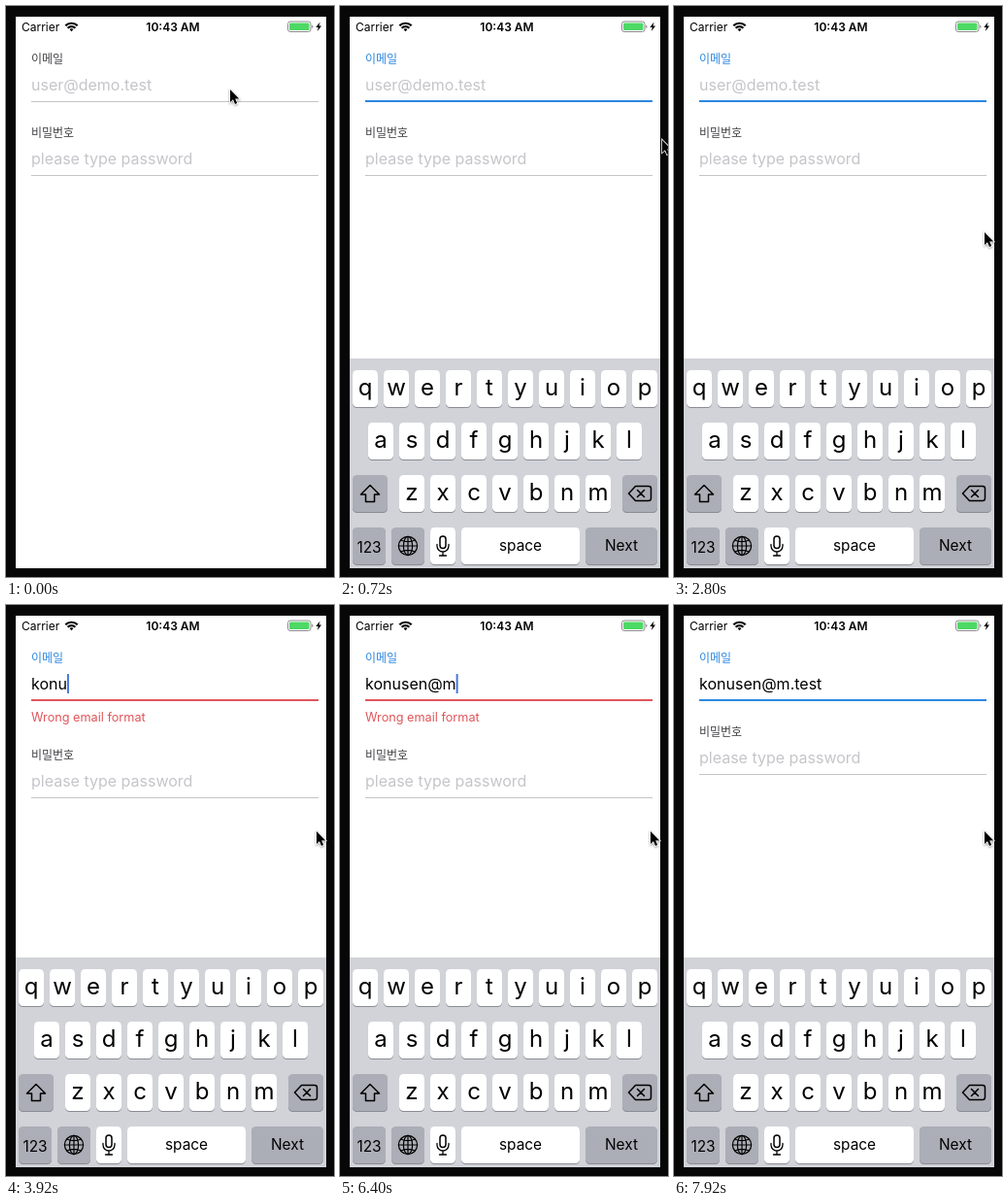
Write an HTML page that moves like this. It is 338x588 px and loops after 8000 ms.

```html
<!DOCTYPE html>
<html lang="ko">
<head>
<meta charset="utf-8">
<style>
  html, body { margin: 0; width: 100%; height: 100%; overflow: hidden; background: #070707; }
  svg { display: block; width: 338px; height: 588px; font-family: Inter, "Open Sans", sans-serif; }
  .label { font: 500 12px "Noto Sans CJK KR", "Noto Sans CJK", sans-serif; fill: #424246; }
  .input { font-size: 16px; }
  .hint { fill: #c5c5ca; }
  .key { font-size: 24px; text-anchor: middle; }
  .word { font-size: 15.4px; text-anchor: middle; }
  .icon { fill: none; stroke: #000; stroke-width: 1.5; stroke-linejoin: round; stroke-linecap: round; }
  #cursor { filter: drop-shadow(0 1px 1px #0006); }
</style>
</head>
<body>
<svg viewBox="0 0 338 588">
  <clipPath id="screen"><path d="M10 11H330V579H10z"/></clipPath>
  <g clip-path="url(#screen)">
    <path d="M10 11H330V579H10z" fill="#fff"/>

    <text x="16" y="25.5" font-size="12">Carrier</text>
    <text x="172" y="25.5" font-size="12" font-weight="600" text-anchor="middle">10:43 AM</text>
    <g fill="none" stroke="#000" stroke-width="2.2">
      <path d="M61.3 20.3a8.8 8.8 0 0 1 12.4 0M63.6 22.8a5.5 5.5 0 0 1 7.8 0"/>
      <path d="M67.5 26.2l-2-2.1a2.9 2.9 0 0 1 4 0z" fill="#000" stroke="none"/>
    </g>
    <rect x="290.5" y="16" width="23.5" height="10.5" rx="2.5" fill="#fff" stroke="#8c8c8c"/>
    <rect x="292" y="17.5" width="20.5" height="7.5" rx="1.2" fill="#4cd964"/>
    <path d="M315.2 19.5v3.6q1.4-.6 1.4-1.8t-1.4-1.8z" fill="#8c8c8c"/>
    <path d="M323.6 16.5l-4.3 5.4h2.5l-1 4.2 4.3-5.5h-2.6z"/>

    <text id="mailLabel" class="label" x="26" y="58.8">이메일</text>
    <text id="mailHint" class="input hint" x="26" y="87">user@demo.test</text>
    <text id="mail" class="input" x="26" y="87"></text>
    <rect id="mailLine" x="26" width="296"/>
    <rect id="caret" y="71" width="2" height="20" fill="#4877dc"/>
    <text id="error" x="26" y="119.6" font-size="12.7" fill="#e0555a">Wrong email format</text>
    <g id="password">
      <text class="label" x="26" y="134.8">비밀번호</text>
      <text class="input hint" x="26" y="163">please type password</text>
      <rect x="26" y="174" width="296" height="1" fill="#c4c4c4"/>
    </g>

    <g id="keyboard">
      <path d="M10 363H330V579H10z" fill="#d1d3d8"/>
      <g id="keys"></g>
      <g class="icon">
        <path d="M31 493.5l-9.5 9.5h5v7.5h9v-7.5h5z"/>
        <path d="M304.5 494.5h13.5q2.5 0 2.5 2.5v10q0 2.5-2.5 2.5h-13.5l-7-7.5zM306.5 498.5l7 7m0-7l-7 7"/>
        <g stroke-width="1.2">
          <circle cx="70" cy="556" r="9.6"/>
          <ellipse cx="70" cy="556" rx="4.6" ry="9.6"/>
          <path d="M70 546.4v19.2M60.4 556h19.2M62.5 550q7.5 3.4 15 0M62.5 562q7.5-3.4 15 0"/>
        </g>
        <rect x="103" y="546" width="6" height="12.5" rx="3"/>
        <path d="M100 554.5v1.5a6 6 0 0 0 12 0v-1.5M106 562v3.7M102.5 566h7" stroke-width="1.3"/>
      </g>
    </g>
  </g>
  <path id="cursor" d="M0 0v13l3-2.8 2 4.7 2.2-.9-2-4.6h4.1z" stroke="#fff" stroke-width="1.6" paint-order="stroke"/>
</svg>
<script>
const LOOP = 8000, STEP = 80, FOCUS = 80, VALID = 7120;
const BLUE = '#2b87e0', RED = '#e0555a', GREY = '#abaeb6';
const address = 'konusen@m.test';
const typedAt = [3200, 3360, 3600, 3760, 4160, 4320, 4560, 5440, 6160, 6480, 6720, 6880, 7120, 7360];
// time, x, y
const cursorPath = [[0, 231, 86], [80, 241, 89], [240, 279, 109], [480, 313, 126], [720, 332, 138],
  [800, 330, 178], [880, 323, 216], [960, 320, 233]];

const $ = id => document.getElementById(id);
const set = (el, attrs) => { for (const k in attrs) el.setAttribute(k, attrs[k]); };
const clamp = x => Math.min(1, Math.max(0, x));
const ease = x => 1 - (1 - clamp(x)) ** 3;

function add(tag, attrs, text = '') {
  const el = document.createElementNS('http://www.w3.org/2000/svg', tag);
  set(el, attrs);
  el.textContent = text;
  $('keys').append(el);
}

function key(x, y, width, text, fill = '#fff', cls = 'word', baseline = 24) {
  const box = { x, width, height: 38, rx: 4.5 };
  add('rect', { ...box, y: y + 1, fill: '#898c92' });
  add('rect', { ...box, y, fill });
  add('text', { x: x + width / 2, y: y + baseline, class: cls }, text);
}

[['qwertyuiop', 13], ['asdfghjkl', 29], ['zxcvbnm', 61]].forEach(([row, x], r) =>
  [...row].forEach((c, i) => key(x + 32 * i, 375 + 54 * r, 26, c, '#fff', 'key', 26)));
key(13, 483, 36, '', GREY);
key(291, 483, 36, '', GREY);
key(13, 537, 34, '123', GREY, 'word', 25.5);
key(53, 537, 34, '', GREY);
key(93, 537, 26, '');
key(125, 537, 122, 'space');
key(253, 537, 74, 'Next', GREY);

function cursorAt(t) {
  const i = cursorPath.findIndex(p => p[0] > t);
  if (i < 0) return cursorPath.at(-1).slice(1);
  const [a, b] = [cursorPath[i - 1], cursorPath[i]];
  const k = (t - a[0]) / (b[0] - a[0]);
  return [1, 2].map(n => a[n] + (b[n] - a[n]) * k);
}

function draw(t) {
  const focused = t >= FOCUS;
  const count = typedAt.filter(time => time <= t).length;
  const wrong = count > 0 && t < VALID;
  const open = t < VALID ? ease((t - typedAt[0] + STEP) / 240) : 1 - ease((t - VALID + STEP) / 240);

  $('mail').textContent = address.slice(0, count);
  $('mailHint').style.display = count ? 'none' : '';
  $('mailLabel').style.fill = focused ? BLUE : '';
  set($('mailLine'), focused
    ? { y: 97, height: 2, fill: wrong ? RED : BLUE }
    : { y: 98, height: 1, fill: '#c4c4c4' });
  set($('error'), { opacity: open });
  set($('password'), { transform: `translate(0 ${24 * open})` });

  const lastInput = count ? typedAt[count - 1] : FOCUS;
  const width = count ? $('mail').getComputedTextLength() : 0;
  set($('caret'), { x: 26 + width, opacity: +(focused && (t - lastInput) % 1000 < 500) });

  const u = Math.max(0, t - 20) / 36.7;
  const drop = 220 * (1 + u) * Math.exp(-u);
  set($('keyboard'), { transform: `translate(0 ${drop < .4 ? 0 : drop})` });
  set($('cursor'), { transform: `translate(${cursorAt(t)})` });
}

const start = performance.now();
function frame() {
  const t = (performance.now() - start) % LOOP;
  draw(Math.floor(t / STEP) * STEP);
  requestAnimationFrame(frame);
}
frame();
</script>
</body>
</html>
```
